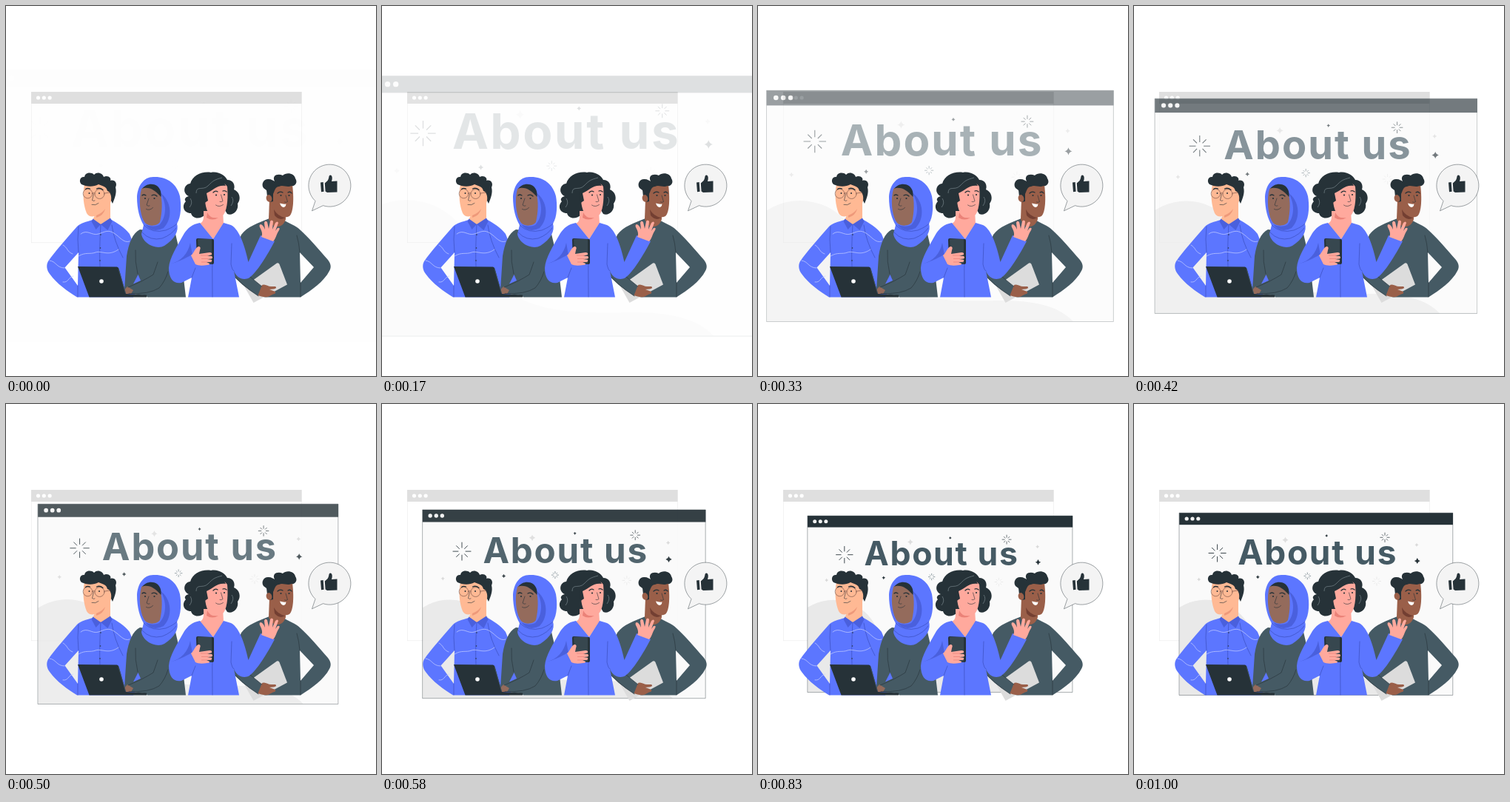
These frames come from a looping animation (500 px wide and 500 px high, 1.04 s). An HTML page:

```html
<!DOCTYPE html>
<html lang="en">
<head>
<meta charset="utf-8">
<title>About us</title>
<style>
html, body { margin: 0; width: 100%; height: 100%; overflow: hidden; background: #fff; }
svg { display: block; width: 100vw; height: 100vh; }
.ink { fill: #263238; }
.blue { fill: #5c76ff; }
.shade { fill: #4a60dd; }
.slate { fill: #455a64; }
.peach { fill: #ffb994; }
.pink { fill: #ffa99d; }
.brown { fill: #946b5c; }
.tan { fill: #9a5f49; }
.line { fill: none; stroke: #263238; stroke-width: .6; stroke-linecap: round; stroke-linejoin: round; }
.thin { stroke-width: .4; }
.brow { fill: none; stroke: #263238; stroke-width: 1.3; stroke-linecap: round; }
.fold { fill: none; stroke: #3c50bd; stroke-width: .7; stroke-linecap: round; }
.wave { fill: none; stroke: #c9d1ff; stroke-width: .7; stroke-linecap: round; }
.title { font: 700 46px Inter, "Open Sans", sans-serif; letter-spacing: 1.7px; fill: #455a64; }
</style>
</head>
<body>
<svg viewBox="0 0 500 500">
  <g id="back">
    <rect x="34.3" y="116.3" width="365" height="203.5" fill="#fff" stroke="#ebebeb" stroke-width=".6"/>
    <rect x="34" y="116" width="365.5" height="16" fill="#dfdfdf"/>
    <g fill="#fff"><circle cx="43.5" cy="124" r="2.6"/><circle cx="51.3" cy="124" r="2.6"/><circle cx="59.1" cy="124" r="2.6"/></g>
  </g>

  <g id="window">
    <rect x="61.4" y="147.2" width="369.4" height="246.3" fill="#fafafa"/>
    <path fill="#e9e9e9" d="M61.4 393.5V275A66 66 0 0 1 160 311C190 378 260 371 310 371C345 371 372 376 388 393.5Z"/>
    <rect class="line thin" x="61.4" y="147.2" width="369.4" height="246.3"/>
    <rect class="ink" x="61.2" y="147.200" width="369.8" height="16"/>
    <g fill="#f2f2f2"><circle cx="71.2" cy="155" r="2.6"/><circle cx="79" cy="155" r="2.6"/><circle cx="86.8" cy="155" r="2.6"/></g>
    <text class="title" x="140.2" y="216.5">About us</text>
    <g id="sparks"></g>
  </g>

  <g id="bubble">
    <path d="M418 263.5A28.5 28.5 0 1 1 428.500 269.700L413.500 276.800Z" fill="#f4f4f4" stroke="#263238" stroke-width=".45"/>
    <path class="ink" d="M425 238.500L428.700 238L429.600 250.800L426 251.300ZM430.800 239.500L434.600 236C437 233 435.600 229.500 438 228.600C441 228.400 441.400 233 440 237L447.500 236.500V251.500L434 252L431.600 250.500Z"/>
  </g>

  <g id="manLeft">
    <path class="blue" fill-rule="evenodd" d="M117 289C108 292 101 293 96 298C83 313 66 332 57 345C54 350 55 357 59 362C68 375 84 386 96 393.500H172L183 373C181 352 174 324 167 308C160 299 150 293 141 288ZM98 333L79.500 353.500L97 378Z"/>
    <path class="peach" d="M119 270L141 258V288C135 297 122 297 117 289L120 283Z"/>
    <path class="peach" d="M106 241C103 256 105 270 109 280C113 287 122 285 129 279C137 275 141 268 142 263C147 264 148 252 142 252L137 241Z"/>
    <path d="M122 283Q130 280 134 274Q132 283 122 286Z" fill="#ee997a"/>
    <path class="ink" d="M102 241C98 237 100 230 106 231C107 225 115 224 119 228C123 223 131 226 132 231C138 228 143 233 141 236C147 234 151 240 148 245C150 252 147 260 144 267L142 263C143 257 141 251 137 250C136 244 130 243 125 241C118 245 108 244 102 241Z"/>
    <g class="line" style="stroke:#6b4a42"><circle cx="110.500" cy="253.500" r="6.300"/><circle cx="126.500" cy="254" r="6.500"/><path d="M116.800 253Q118.500 251.500 120 253M133 253L141 252"/></g>
    <circle class="ink" cx="112.500" cy="253" r="1"/><circle class="ink" cx="126" cy="253" r="1"/>
    <path class="brow" d="M107.500 247.500Q110 245.500 113.500 247M122.500 247Q127 245 131 248.500"/>
    <path class="line" d="M118.500 254L116.500 262.500Q118 264 120 263M116 268.500Q121 270 125 266.500"/>
    <path class="shade" d="M117.500 287.500L128 295L121.500 302L115.500 291ZM141 286.500L128 295L137.500 303L143.500 291Z"/>
    <path class="fold" d="M128 295Q126 330 127 352M98 298Q96 315 98 333M97 378V393M143 296Q146 318 158 340"/>
    <path class="wave" d="M101 308C110 301 116 311 125 308S138 302 146 307S159 321 167 318M98 338C108 332 113 336 121 333S138 339 152 329M77 323C84 327 82 332 90 335M59 344C68 345 68 354 79 354M77 373C85 374 83 367 91 365"/>
    <g class="ink"><circle cx="128" cy="309" r=".8"/><circle cx="127.500" cy="327" r=".8"/><circle cx="127" cy="344" r=".8"/></g>
  </g>

  <g id="womanHijab">
    <path class="slate" d="M181 302C171 307 166 320 163 338L160 384L166 389C178 390 189 390 191 393.500H243C240 366 237 340 229 308Z"/>
    <path class="blue" d="M172 375.500L178.500 363L182 371Z"/>
    <path class="brown" d="M164 379L159.500 384L162 389H169L172 384Z"/>
    <path class="line" d="M178 362Q174 345 175 330M205 346Q202 355 199 363Q185 372 165 380M166 388.500Q193 390 207 381Q215 372 219 359"/>
    <path class="blue" d="M199 231C186 231 178 243 177 258C177 275 181 288 186 296L183 308C185 321 203 330 214 324C228 315 234 304 231 294C237 285 237 268 235 257C231 240 217 230 199 231Z"/>
    <path class="shade" d="M208 252C218 266 217 286 207 296Q198 300 188 295Q198 308 213 300C225 288 225 264 208 252Z"/>
    <path class="brown" d="M183 247C179 262 181 280 186 290C190 299 204 298 208 292C211 280 212 263 208 251C200 243 189 242 183 247Z"/>
    <path class="ink" d="M184 247C189 240 198 239 204 243C209 247 210 252 209.500 258C205 253 199 247 192 246Q187 245 184 247Z"/>
    <path class="fold" d="M186 296Q198 308 216 303Q228 298 231 294M184 306Q195 318 211 314Q224 309 230 300"/>
    <path class="brow" d="M184 256Q186 254 189 256M197 256Q201 254 204 257"/>
    <circle class="ink" cx="188" cy="260" r="1.100"/><circle class="ink" cx="200.500" cy="260" r="1.100"/>
    <path class="line" d="M193 260L190 269Q192 271 194 270M189.500 274.500Q194 277 198.500 272.500"/>
  </g>

  <g id="laptop">
    <path class="ink" d="M97 352L150 352.500Q152 353 152.500 355L162 389L190 390.500V393.500H112.500Z"/>
    <path d="M152 355L161.500 388" stroke="#455a64" stroke-width=".8"/>
    <circle cx="129" cy="372" r="2.800" fill="#fff"/>
  </g>

  <g id="manRight">
    <path class="slate" fill-rule="evenodd" d="M356 287C341 293 326 298 318 309L303 345V360L341 392L350 393.500H398C413 384 430 372 437 358C440 353 439 348 435 343C422 328 410 314 398 303C391 296 382 294 375 289ZM397 333L416 353L398 374Z"/>
    <path class="line" d="M397 333Q396 320 393 310M398 374V393"/>
    <path class="tan" d="M356 262L378 270V288C374 302 359 301 355 288Z"/>
    <path class="tan" d="M361 241C358 250 359 262 360 272C365 283 376 288 383 284C389 278 389 258 387 242Z"/>
    <path d="M362 275Q367 284 377 286Q370 291 363 283Z" fill="#733f32"/>
    <path class="ink" d="M348 246C344 240 349 233 355 234C359 234 361 236 363 237C359 229 367 226 374 229C379 224 390 226 391 233C395 239 390 244 386 243C380 246 374 241 369 244C364 244 363 250 361 254V264L357 265C352 260 353 254 352 249Z"/>
    <ellipse class="tan" cx="355.500" cy="260" rx="3.800" ry="5" transform="rotate(-15 355.500 260)"/>
    <path class="brow" d="M367 253Q370 250 374 252M381 252Q384 250 386 253"/>
    <circle class="ink" cx="371.500" cy="256" r="1.100"/><circle class="ink" cx="382.500" cy="256" r="1.100"/>
    <path class="line" d="M378 256L380.500 264.500Q378.500 266 376.500 265"/>
    <path d="M370 266.500Q374 268 378.500 267.500Q378 272 374.500 272Q371.500 271 370 266.500Z" fill="#fff"/>
    <path d="M322 379L366 347.500Q368.500 346.500 369.500 349L380 376.500L334.500 401Z" fill="#dcdcdc"/>
    <path class="slate" d="M304 345L346 379L341 392Q317 377 303 360Z"/>
    <path class="tan" d="M346 377C350 375 354 379 358 379L364 379Q367 381 362 382.500L356 383L364 386Q365 389 361 389.500L358 391C353 395 345 393 340.500 391Z"/>
    <path class="line" d="M304 360Q318 377 341 392M320 358L346 379"/>
  </g>

  <g id="womanCurly">
    <path class="ink" d="M247 257C238 253 240 241 249 240C252 229 265 223 277 225C287 223 296 229 299 235C307 235 310 242 308 248C316 251 318 261 313 267C315 277 306 284 299 281L291 268L270 281C263 289 252 288 250 280C240 280 237 270 243 264C240 261 243 258 247 257Z"/>
    <path class="pink" d="M267 277H293L294 294L280 315L262 294C268 291 267 285 267 277Z"/>
    <path class="blue" d="M262 293C251 295 246 300 241 307C231 325 221 340 220 354C220 369 227 376 237 374L251 367L246 393.500H315L308 358C311 367 321 372 329 367C339 360 353 337 363 318L344 310L327.500 346C323 326 316 302 304 296L294 293L280 315Z"/>
    <path class="pink" d="M270 248C268 261 269 275 275 281C281 288 289 286 294 282C300 274 300 255 299 244C294 236 285 237 279 243Z"/>
    <path class="ink" d="M266 251C266 241 277 234 292 234L297 243C286 241 280 249 271 253L273 263L267 267Z"/>
    <path d="M272 279Q276 288 287 286Q279 291 271 286Z" fill="#eb8278"/>
    <path d="M257 253C257 242 266 250 273 243S281 235 292 232M248 272Q253 266 249 260M305 258Q309 263 304 270" fill="none" stroke="#78868c" stroke-width=".7"/>
    <path class="brow" d="M280 252Q283 249 286 251M293 250Q296 249 298 251"/>
    <circle class="ink" cx="284" cy="255.500" r="1.100"/><circle class="ink" cx="295" cy="255" r="1.100"/>
    <path class="line" d="M290.500 255L293 263.500Q291 265.500 289 264.500M283.500 269Q288 272.500 293.500 268.500"/>
    <path class="fold" d="M280 315Q278 355 279 393M251 367L256 354M305 321L304 349Q306 358 308 358"/>
    <path class="shade" d="M224 348C236 345 246 335 249 320L252 337C243 344 232 348 224 348Z"/>
    <path d="M257 316Q257 314 259 314L279 315Q281 315 281 317V347Q281 349 279 349L260 348Q258 348 258 346Z" fill="#263238"/>
    <path d="M259 315H278V348H261Z" fill="#37474f"/>
    <path class="blue" d="M223 348C230 347 243 341 251 336L257 350Q251 360 238 373Q225 374 223 360Z"/>
    <path class="pink" d="M250 337C254 334 256 326 260 325Q264 325 262 330L261 335L275 333Q279 333 278 336L272 338L278 338Q280 340 278 341.500L272 342L278 343Q279 346 276 346L271 346L275 348Q275 350 272 350C265 351 260 351 256 349Z"/>
    <path d="M263 337L273 337M264 341.500H273M264 346H272" fill="none" stroke="#e5786f" stroke-width=".6"/>
    <path class="pink" d="M345 312C347 309 346 305 344 301Q341 296 344 295Q347 295 350 302L349 293Q350 289 353 292L355 301L357 291Q359 288 361 291L360 302L364 293Q367 290 368 293L364 304L367 300Q371 299 369 303C365 309 365 314 361 318Z"/>
  </g>
</svg>
<script>
const CENTER = { x: 246.1, y: 270.4 };
const LOOP = 1040, STEPS = 25;
const FPS = 24, LEAD = .033;
const win = document.getElementById('window');
const sparks = document.getElementById('sparks');

function add(d, attrs) {
  const el = document.createElementNS('http://www.w3.org/2000/svg', 'path');
  el.setAttribute('d', d);
  for (const key in attrs) el.setAttribute(key, attrs[key]);
  sparks.append(el);
}

function burst(x, y, inner, outer, stroke, width) {
  let d = '';
  for (let i = 0; i < 8; i++) {
    const a = i * Math.PI / 4, r = i % 2 ? outer * .88 : outer;
    const c = Math.cos(a), s = Math.sin(a);
    d += `M${x + inner * c} ${y + inner * s}L${x + r * c} ${y + r * s}`;
  }
  add(d, { fill: 'none', stroke, 'stroke-width': width });
}

function star(x, y, r, fill) {
  add(`M${x} ${y - r}Q${x + r * .2} ${y - r * .2} ${x + r} ${y}Q${x + r * .2} ${y + r * .2} ${x} ${y + r}` +
      `Q${x - r * .2} ${y + r * .2} ${x - r} ${y}Q${x - r * .2} ${y - r * .2} ${x} ${y - r}Z`, { fill });
}

burst(112.6, 201.5, 4.5, 12, '#263238', .9);
burst(339, 180.3, 2.6, 6.6, '#263238', .7);
burst(234.3, 232.4, 2, 4.8, '#455a64', .6);
burst(328, 239.5, 2.5, 6, '#e0e0e0', .6);
star(204.5, 183.8, 4, '#dedede');
star(382, 190.3, 2.6, '#d8d8d8');
star(87.7, 237, 2.6, '#d8d8d8');
star(260.2, 178, 2, '#263238');
star(167.3, 233.7, 2.5, '#263238');
star(382.8, 212, 4, '#263238');

const bezier = (s, a, b) => 3 * (1 - s) * (1 - s) * s * a + 3 * (1 - s) * s * s * b + s * s * s;

// cubic-bezier(.36, -.01, .5, 1.38)
function ease(p) {
  if (p >= 1) return 1;
  let lo = 0, hi = 1;
  for (let i = 0; i < 30; i++) {
    const mid = (lo + hi) / 2;
    if (bezier(mid, .36, .5) < p) lo = mid; else hi = mid;
  }
  return bezier(lo, -.01, 1.38);
}

// Steps begin at multiples of LOOP / STEPS, rounded to 10 ms.
function stepAt(t) {
  let k = 0;
  while (k < STEPS - 1 && Math.round((k + 1) * LOOP / STEPS / 10) * 10 <= t) k++;
  return k;
}

function draw(t) {
  const e = ease(stepAt(t) / FPS + LEAD);
  const { x, y } = CENTER;
  win.setAttribute('transform', `translate(${x} ${y}) scale(${1.5 - .5 * e}) translate(${-x} ${-y})`);
  win.setAttribute('opacity', Math.min(1, Math.max(0, e)));
}

const start = performance.now();
function tick() {
  draw((performance.now() - start) % LOOP);
  requestAnimationFrame(tick);
}
tick();
</script>
</body>
</html>
```
